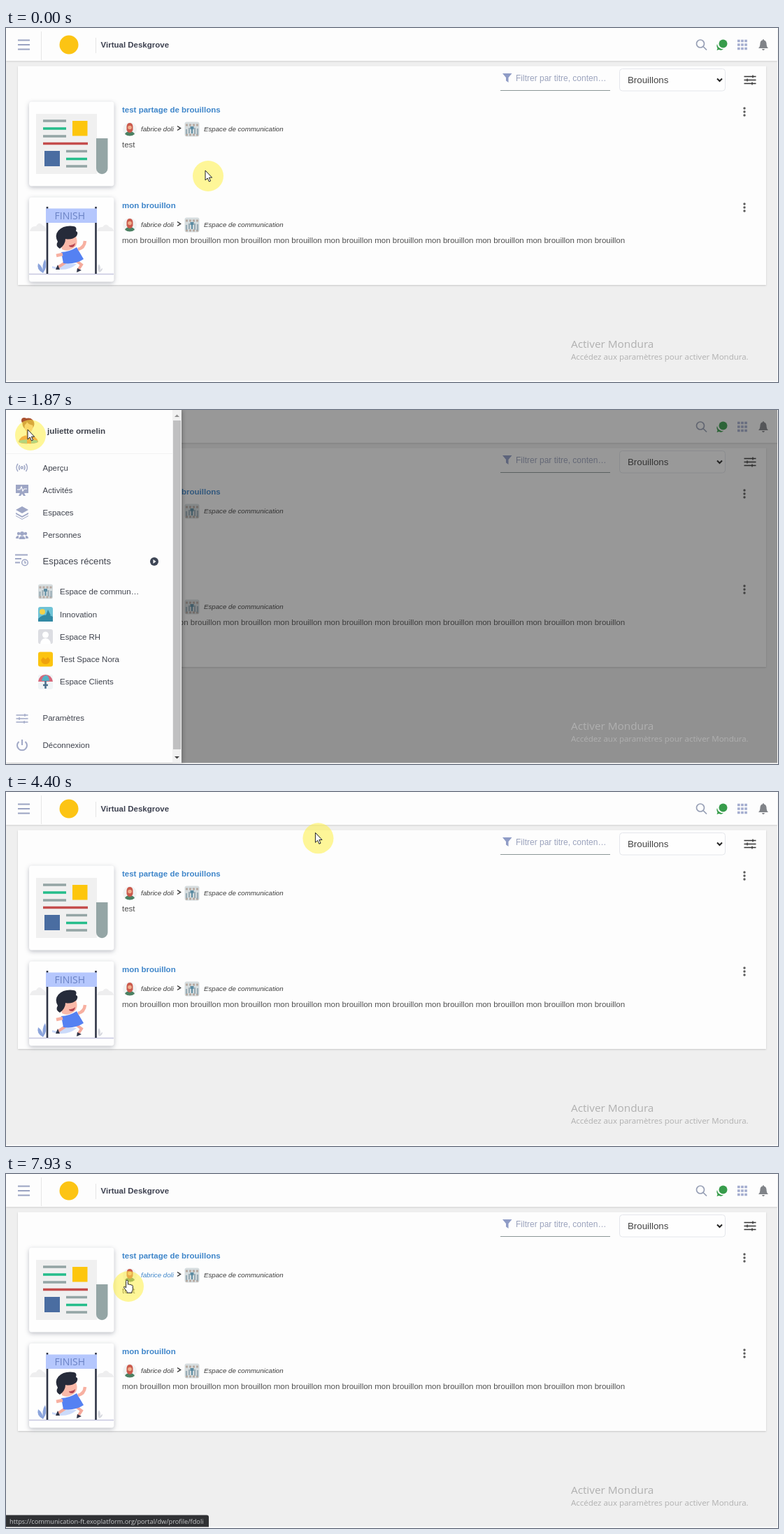
An HTML page for the animation above (8000 ms loop, 1104 by 507 pixels).

```html
<!DOCTYPE html>
<html lang="fr">
<head>
<meta charset="utf-8">
<title>Brouillons</title>
<style>
html, body { margin: 0; width: 100%; height: 100%; overflow: hidden; background: #fff; }
svg { display: block; width: 100vw; height: 100vh; }
text { font: 11.5px "Liberation Sans", Arial, sans-serif; fill: #505050; white-space: pre; }
.b { font-weight: bold; fill: #3d4150; }
.title { font-weight: bold; fill: #3f86ca; }
.meta { font-size: 9.7px; font-style: italic; fill: #3c3c3c; }
.mark text { font-family: "Open Sans", sans-serif; fill: #b0b0b0; }
.card { fill: #fefefe; filter: drop-shadow(0 2px 3px rgba(40, 45, 70, .3)); }
.line { fill: none; stroke-width: 2; }
#drawer text { fill: #3f434d; }
</style>
</head>
<body>
<svg viewBox="0 0 1104 507">
  <defs>
    <g id="man">
      <circle r="10" fill="#f1f3f3"/>
      <path d="M-7 7Q-5 3 0 3T7 7Q4 9.500 0 9.500T-7 7Z" fill="#4b8163"/>
      <path d="M-4.500-4Q-4-9 0-9T4.500-4V1Q3 5 0 5T-4.500 1Z" fill="#cb5a4c"/>
      <ellipse cy="-2.500" rx="2.800" ry="2.800" fill="#efae8c"/>
    </g>
    <g id="space">
      <rect x="-10.5" y="-10.5" width="21" height="21" rx="3" fill="#d6dddf"/>
      <path d="M-9-6H9M-9 8H9" stroke="#b7aaa2" stroke-width="3" stroke-dasharray="3 2"/>
      <path d="M-8 0V7M-4-2V6M4-2V7M8-1V8" stroke="#9aadb6" stroke-width="2.2"/>
      <path d="M-2.500-4H2.500V0H1V6H-1V0H-2.500Z" fill="#5c8ca2"/>
    </g>
    <g id="kebab" fill="#5c5c5c"><circle cy="-5" r="1.7"/><circle r="1.7"/><circle cy="5" r="1.7"/></g>
    <g id="meta">
      <use href="#man" x="177" y="145"/>
      <path class="line" d="M245 140.500L249.500 143.500L245 146.500" stroke="#333" style="stroke-width:1.5"/>
      <use href="#space" x="266" y="145"/>
      <text class="meta" x="283" y="148">Espace de communication</text>
      <use href="#kebab" x="1056" y="120"/>
    </g>
    <path id="sliders" class="line" style="stroke-width:1.3" d="M-8.500-5H8.500M-8.500 0H8.500M-8.500 5H8.500M4-7V-3M-4-2V2M3 3V7"/>
  </defs>

  <!-- page -->
  <rect width="1103" height="505.500" fill="#efefef"/>
  <rect width="1103" height="47" fill="#fdfdfd" style="filter:drop-shadow(0 1px 1px rgba(0,0,0,.13))"/>
  <path class="line" d="M17 17.500H34M17 24H34M17 30.500H34" stroke="#9aa3c2"/>
  <path d="M50.500 5V46M128.500 14V36" stroke="#e6e6e6"/>
  <circle cx="90" cy="24" r="13.500" fill="#fcc414"/>
  <text class="b" x="135.500" y="28">Virtual Deskgrove</text>
  <g class="line" stroke="#979fb5" style="stroke-width:1.7"><circle cx="993" cy="22.500" r="5.500"/><path d="M997 26.500L1002 31.500"/></g>
  <g fill="#379c4b"><circle cx="1025.500" cy="22.500" r="6"/><path d="M1017 23Q1018 30 1026 30.500Q1023 32.500 1019.500 31L1016.500 32L1017.500 29Q1015.500 26 1017 23Z"/></g>
  <path class="line" d="M1046 18.500H1060M1046 24H1060M1046 29.500H1060" stroke="#a4adcf" stroke-dasharray="3.700 1.400" style="stroke-width:3.6"/>
  <path d="M1076 29Q1078.500 27 1078.500 22Q1079 17.500 1082 17.500Q1082 16 1083 16T1084 17.500Q1087 18 1087.500 22Q1087.500 27 1090 29ZM1081 30H1085Q1084.500 32 1083 32T1081 30Z" fill="#808388"/>

  <rect x="17" y="54.500" width="1070" height="313.500" fill="#fdfdfd" style="filter:drop-shadow(0 1px 1px rgba(0,0,0,.16))"/>
  <path d="M710 65H723.500L718.500 71V78L715 75.500V71Z" fill="#8f9cc6"/>
  <text x="729" y="76" style="font-size:12px;fill:#9ba3bd">Filtrer par titre, conten…</text>
  <path d="M707 89.500H864" stroke="#8b9797"/>
  <rect x="877.500" y="58.500" width="151" height="31.500" rx="4" fill="#fefefe" stroke="#e4e6eb"/>
  <text x="889" y="79" style="font-size:13.3px;fill:#444">Brouillons</text>
  <path class="line" d="M1017 72.500L1020.500 76L1024 72.500" stroke="#222"/>
  <use href="#sliders" x="1064" y="74.500" stroke="#333"/>

  <rect class="card" x="33" y="105.500" width="121.500" height="121" rx="4"/>
  <rect x="43" y="123" width="87" height="86" fill="#f0f0f0"/>
  <path d="M129 158H145.500V201A8.200 8.200 0 0 1 129 201Z" fill="#94a5a5"/>
  <g class="line" style="stroke-width:3.6">
    <path d="M53 133H86M53 155H86M86 176.500H116M86 198H116" stroke="#94a5a5"/>
    <path d="M53 144H86M86 187.500H116" stroke="#25bd8b"/>
    <path d="M53 165.500H117" stroke="#c44d4d"/>
  </g>
  <rect x="95" y="133" width="21.500" height="21.500" fill="#fdc60d"/>
  <rect x="55" y="176" width="22" height="22" fill="#4a6da1"/>
  <text class="title" x="166" y="121">test partage de brouillons</text>
  <use href="#meta"/>
  <text class="meta" id="author" x="193" y="148">fabrice doli</text>
  <text x="166" y="171">test</text>

  <rect class="card" x="33" y="242.500" width="121.500" height="121" rx="4"/>
  <path d="M34 291Q36 283 43 284Q47 276 53 283Q58 285 57 291ZM130 291Q132 284 138 285Q143 278 148 285Q153 286 154 291Z" fill="#eeeeef"/>
  <path d="M33 352.500H154" stroke="#c5c6df" stroke-width="1.600"/>
  <path d="M59 256V352M128.500 256V352" stroke="#2e3445" stroke-width="2.600"/>
  <rect x="57" y="258.500" width="73" height="20.500" fill="#b5c7fd"/>
  <text x="69.500" y="274" style="font:500 14px 'Open Sans',sans-serif;fill:#6a82c4">FINISH</text>
  <!-- runner -->
  <path d="M66 341Q76 345 84 337L101 338Q88 350 66 344Z" fill="#cbdafa"/>
  <path d="M86 335L74 343M100 333L108 339L103 347" stroke="#f4a99b" stroke-width="4" fill="none"/>
  <path d="M74 339L71 346L77 346ZM102 344L108 347L101 350Z" fill="#30364a"/>
  <path d="M79 321Q90 321 101 314L111 331Q99 339 82 337Z" fill="#5581f2"/>
  <path d="M103 317Q112 315 113 305M81 324L72 326" stroke="#f7b0a1" stroke-width="4.500" fill="none"/>
  <path d="M77 302L98 294Q104 305 100 312Q90 322 80 317Z" fill="#f9b9a9"/>
  <path d="M77 316Q70 312 74 306Q69 297 75 290Q83 282 97 284Q102 285 100 291Q104 292 101 298Q94 304 85 302Q85 310 77 316Z" fill="#262b3a"/>
  <path d="M90 311Q95 312 99 308Q98 314 94 314T90 311Z" fill="#b64552"/>
  <path d="M53 351Q43 346 46 337Q53 342 53 351Q51 338 56 331Q60 342 53 351Z" fill="#8ba4dc"/>
  <path d="M133 350Q130 343 133 338Q137 344 133 350Q136 344 138 344Q138 348 133 350Z" fill="#d3d5dc"/>
  <text class="title" x="166" y="258">mon brouillon</text>
  <use href="#meta" y="137"/>
  <text class="meta" x="193" y="285">fabrice doli</text>
  <text id="body" x="166" y="308"></text>

  <rect id="shade" width="1103" height="505.500" fill="#212121"/>
  <g class="mark">
    <text x="808" y="458" style="font-size:15.3px">Activer Mondura</text>
    <text x="808" y="475">Accédez aux paramètres pour activer Mondura.</text>
  </g>

  <!-- side menu -->
  <g id="drawer">
    <rect width="251" height="505.500" fill="#fdfdfd" style="filter:drop-shadow(1px 0 3px rgba(0,0,0,.3))"/>
    <rect x="238" width="13" height="505.500" fill="#f1f1f1"/>
    <rect x="239" y="15" width="11" height="471" fill="#c0c0c1"/>
    <path d="M241 10L244.500 6.500L248 10Z" fill="#909090"/>
    <path d="M241 496L244.500 499.500L248 496Z" fill="#444"/>
    <path d="M0 62.500H238" stroke="#f2f2f2"/>
    <g>
      <path d="M18 46Q20 36 32 36T46 46Q38 49 32 48Q24 49 18 46Z" fill="#e7693f"/>
      <path d="M18 44L30 42V48L20 47ZM46 44L36 42V48L44 47Z" fill="#58b5c1"/>
      <circle cx="32" cy="20" r="8.500" fill="#a9512f"/><circle cx="26" cy="15" r="4" fill="#a9512f"/>
      <path d="M29 29H35V37Q32 40 29 37Z" fill="#eaa582"/>
      <ellipse cx="32.500" cy="24" rx="6" ry="8" fill="#f4b793"/>
      <path d="M25 22Q27 15 34 15Q40 16 39 22Q32 21 30 17Q29 21 25 22Z" fill="#a9512f"/>
    </g>
    <text class="b" x="59" y="33.500" style="font-size:11.7px">juliette ormelin</text>
    <g class="line" stroke="#a0a8c6" style="stroke-width:1.5">
      <path d="M19.500 79Q17.500 82.500 19.500 86M17 77Q13 82.500 17 88M26 79Q28 82.500 26 86M28.500 77Q32.500 82.500 28.500 88"/>
      <circle cx="22.700" cy="82.500" r="1.500"/>
      <path d="M13 207.500H31M13 213H22M13 218.500H20" style="stroke-width:2"/>
      <circle cx="27" cy="218.500" r="4.300"/><path d="M27 216V219H29"/>
      <use href="#sliders" x="23" y="442"/>
      <path d="M18.500 475A7 7 0 1 0 27.500 475M23 472V480" style="stroke-width:2"/>
    </g>
    <g fill="#9ea6c5">
      <path d="M14 107H32V119H26L28 123H25L23 120L21 123H18L20 119H14Z"/>
      <path d="M23 138L32 143L23 148L14 143ZM14 147L23 152L32 147V149L23 154L14 149ZM14 151L23 156L32 151V152L23 157L14 152Z"/>
      <circle cx="23" cy="177" r="3"/><circle cx="18" cy="177" r="2.200"/><circle cx="28" cy="177" r="2.200"/>
      <path d="M18.500 185Q18.500 180.500 23 180.500T27.500 185ZM14 184Q14 180 18 180V184ZM28 180Q32 180 32 184H28Z"/>
    </g>
    <path class="line" d="M16 114H20L22 110L24 116L26 113H30" stroke="#fff" style="stroke-width:1.2"/>
    <circle cx="212" cy="217" r="6" fill="#3d4555"/><path d="M210.500 214L214.500 217L210.500 220Z" fill="#fff"/>
    <text x="52.500" y="220.500" style="font-size:13.200px">Espaces récents</text>
    <g id="items"></g>
    <use href="#space" x="56.500" y="260"/>
    <rect x="46" y="282" width="21" height="21" rx="3" fill="#6fc3d6"/>
    <circle cx="52" cy="289" r="4" fill="#f2d24b"/><path d="M46 299Q55 290 67 296V303H46ZM60 286L64 294H57Z" fill="#3289a4"/>
    <rect x="46" y="314" width="21" height="21" rx="3" fill="#dcdde2"/>
    <path d="M49 335Q50 327 56.500 327T64 335Z" fill="#fff"/><circle cx="56.500" cy="322" r="4.500" fill="#fff"/>
    <rect x="46" y="346.500" width="21" height="21" rx="3" fill="#fcc40f"/>
    <path d="M50 358L53 354L56.500 357L60 354L63 358Q62 364 56.500 364T50 358Z" fill="#efa20d"/>
    <rect x="46" y="379" width="21" height="21" rx="3" fill="#f0f4f6"/>
    <path d="M46 389Q48 379 56.500 379T67 389Z" fill="#d7677a"/><path d="M51 388Q52 381 56.500 380T62 388Z" fill="#54b3c6"/>
    <path d="M56.500 388V399M53 394H60" stroke="#4b6f8b" stroke-width="2.500"/>
  </g>

  <g id="status">
    <path d="M0 488.500H287Q290 488.500 290 491.500V505.500H0Z" fill="#303134"/>
    <text x="5" y="500.500" style="font:9.200px 'Open Sans',sans-serif;fill:#c9cacc">https://communication-ft.exoplatform.org/portal/dw/profile/fdoli</text>
  </g>

  <!-- pointer -->
  <circle id="glow" r="22" fill="#fff046" fill-opacity=".55"/>
  <circle id="ring" class="line" style="stroke-width:3"/>
  <g id="tip" fill="#fff" stroke="#222" stroke-linejoin="round">
    <path id="arrow" d="M-4-8V6L-.8 3L1.400 8L3.600 7L1.400 2.200H5.600Z"/>
    <path id="hand" d="M-3.400 2V-7.600a1.400 1.400 0 0 1 2.800 0V-2.800q1.400-1 2.400 .3q1.600-.7 2.200 .6q2-.5 2.300 1.200V3.500q0 2-1.300 4V9.200H-2V7.600Q-4.500 4.500-6.300 1.600q-.6-1.800 1.200-1.300Z"/>
  </g>
</svg>
<script>
const $ = id => document.getElementById(id);
const LOOP = 8000;
$('body').textContent = Array(10).fill('mon brouillon').join(' ');

const items = [
  [52.5, 86.5, 'Aperçu'], [52.5, 118.5, 'Activités'], [52.5, 151, 'Espaces'], [52.5, 183, 'Personnes'],
  [77, 264, 'Espace de commun…'], [77, 296.5, 'Innovation'], [77, 328.5, 'Espace RH'],
  [77, 361, 'Test Space Nora'], [77, 393, 'Espace Clients'],
  [52.5, 445, 'Paramètres'], [52.5, 483.5, 'Déconnexion']
];
$('items').innerHTML = items.map(([x, y, s]) => `<text x="${x}" y="${y}">${s}</text>`).join('');

// pointer path: time, x, y
const path = [
  [0, 289, 212], [70, 289, 212], [500, 180, 150], [870, 40, 42], [1000, 34, 38], [1700, 34, 38],
  [1870, 35, 36], [2000, 35, 36], [2350, 110, 66], [2650, 178, 86], [2870, 194, 74], [3000, 191, 64],
  [3300, 290, 66], [3530, 368, 74], [3870, 368, 74], [4000, 413, 76], [4670, 474, 61], [5000, 680, 64],
  [5330, 921, 86], [5600, 924, 86], [5800, 960, 107], [6000, 960, 107], [6800, 850, 137],
  [7100, 690, 139], [7700, 230, 142], [7870, 176, 158], [7930, 175, 161], [LOOP, 175, 161]
];
const hands = [[850, 1830], [2100, 3150], [5230, 5650], [7780, LOOP]];
const clicks = [[1150, 31, 29], [3730, 364, 67]];

const slope = (i, k) => (path[i + 1][k] - path[i][k]) / (path[i + 1][0] - path[i][0]);
function tangent(i, k) {
  if (i < 1 || i > path.length - 2) return 0;
  const a = slope(i - 1, k), b = slope(i, k);
  return a * b <= 0 ? 0 : 2 * a * b / (a + b);
}
function along(t, k) {
  let i = 0;
  while (i < path.length - 2 && path[i + 1][0] <= t) i++;
  const d = path[i + 1][0] - path[i][0], u = (t - path[i][0]) / d, v = 1 - u;
  return path[i][k] * v * v * (1 + 2 * u) + path[i + 1][k] * u * u * (3 - 2 * u)
    + d * u * v * (v * tangent(i, k) - u * tangent(i + 1, k));
}
function slide(t, start) {
  const x = Math.min(1, Math.max(0, (t - start) / 200)) ** .6;
  return x * x * (3 - 2 * x);
}
const show = (id, on) => $(id).style.display = on ? '' : 'none';

function draw(t) {
  const open = slide(t, 1400) - slide(t, 3872);
  show('drawer', open > 0);
  $('drawer').setAttribute('transform', `translate(${251 * (open - 1)})`);
  $('shade').setAttribute('opacity', .46 * Math.max(0, open) ** .68);

  const move = `translate(${along(t, 1)} ${along(t, 2)})`;
  $('glow').setAttribute('transform', move);
  $('tip').setAttribute('transform', move);
  const hand = hands.some(([a, b]) => t >= a && t < b);
  show('hand', hand);
  show('arrow', !hand);

  const click = clicks.find(([at]) => t >= at && t < at + 320);
  show('ring', click);
  if (click) {
    const [at, x, y] = click, u = (t - at) / 320, ring = $('ring');
    ring.setAttribute('cx', x);
    ring.setAttribute('cy', y);
    ring.setAttribute('r', 10 - 5.5 * u);
    ring.setAttribute('stroke', u < .5 ? '#dc701f' : '#a0808c');
  }

  const hover = t >= 7780;
  show('status', hover);
  $('author').style.fill = hover ? '#3f86ca' : '';
}
function tick(now) {
  draw(now % LOOP);
  requestAnimationFrame(tick);
}
draw(0);
requestAnimationFrame(tick);
</script>
</body>
</html>
```
